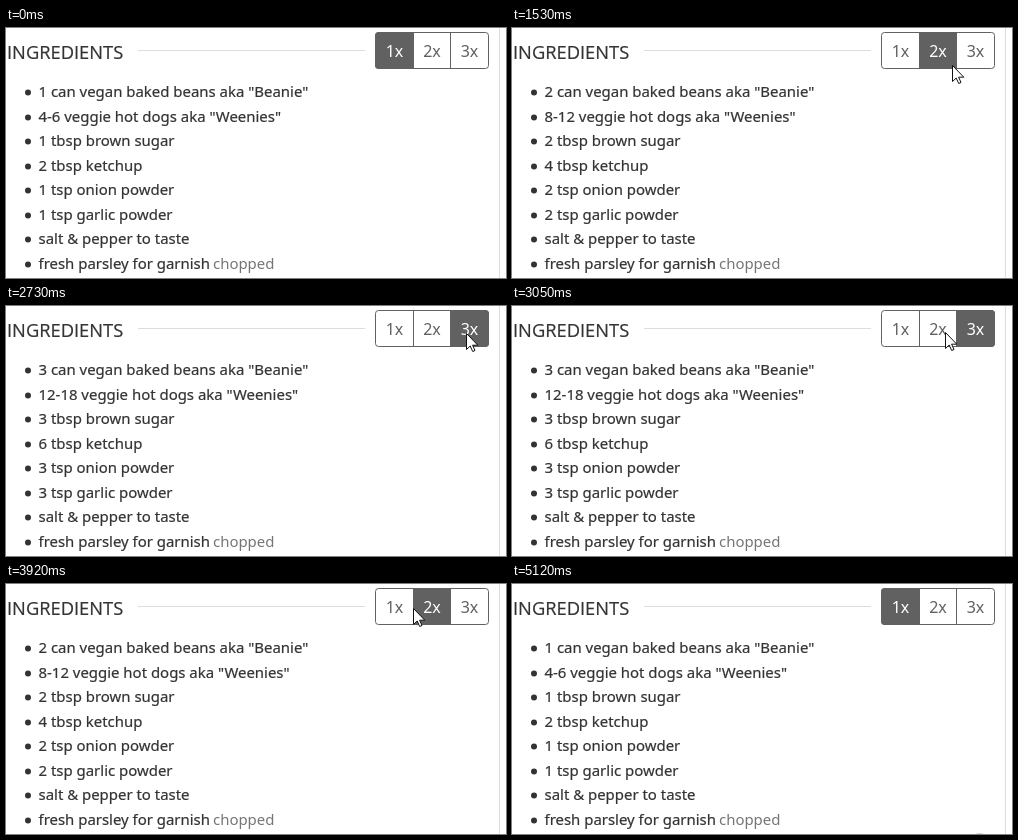
An HTML page that plays this animation: 500 px wide and 250 px high, repeating every 5200 ms.

```html
<!DOCTYPE html>
<html lang="en">
<head>
<meta charset="utf-8">
<title>Ingredient scaling</title>
<style>
  html, body { margin: 0; width: 100%; height: 100%; overflow: hidden; background: #fff; }
  svg { display: block; width: 500px; height: 250px; }
  text { font: 14.95px "Noto Sans", "Open Sans", sans-serif; fill: #333; stroke: #333; stroke-width: .2px; white-space: pre; }
  .heading { font: 18.3px "Open Sans", "Noto Sans", sans-serif; }
  .note { fill: #757575; stroke: none; }
  .rule { stroke: #ddd; }
  .scale text { font-size: 16px; text-anchor: middle; fill: #616161; stroke: none; }
  .scale path { fill: #fff; }
  .scale .on path { fill: #616161; }
  .scale .on text { fill: #fff; }
  .frame { fill: none; stroke: #616161; }
</style>
</head>
<body>
<svg viewBox="0 0 500 250">
  <text class="heading" x="1" y="31">INGREDIENTS</text>
  <path class="rule" d="M132 22.5H359M493.5 0V250"/>
  <g class="scale" id="scale"></g>
  <path class="frame" d="M407.5 4.5V40.5M444.5 4.5V40.5M372.5 4.5H479.5a3 3 0 0 1 3 3V37.5a3 3 0 0 1-3 3H372.5a3 3 0 0 1-3-3V7.5a3 3 0 0 1 3-3Z"/>
  <g id="list"></g>
  <circle id="halo" r="12" fill="#fff200"/>
  <path id="cursor" d="M.5.5V16.5L4.2 13 6.7 18.5 9 17.5 6.6 12.2H11.8Z" fill="#fff" stroke="#111"/>
  <path id="trace" d="M463 250Q467.5 248.5 472 250Z" fill="#bbb"/>
</svg>
<script>
const LOOP = 5200;
const byId = id => document.getElementById(id);
const add = (parent, tag, attrs, content = '') => {
  const el = document.createElementNS('http://www.w3.org/2000/svg', tag);
  for (const key in attrs) el.setAttribute(key, attrs[key]);
  el.textContent = content;
  return parent.appendChild(el);
};

// Each ingredient: base amounts, then the label.
const ingredients = [
  [[1], ' can vegan baked beans aka "Beanie"'],
  [[4, 6], ' veggie hot dogs aka "Weenies"'],
  [[1], ' tbsp brown sugar'],
  [[2], ' tbsp ketchup'],
  [[1], ' tsp onion powder'],
  [[1], ' tsp garlic powder'],
  [[], 'salt & pepper to taste'],
  [[], 'fresh parsley for garnish']
];
const rows = ingredients.map(([amounts, label], i) => {
  const y = Math.round(69 + i * 24.57);
  add(byId('list'), 'circle', { cx: 22, cy: y - 4.5, r: 3, fill: '#333' });
  return { amounts, label, el: add(byId('list'), 'text', { x: 32.5, y }) };
});
add(byId('list'), 'text', { x: 207, y: 241, class: 'note' }, 'chopped');

const shapes = [
  'M408 4H373a4 4 0 0 0-4 4V37a4 4 0 0 0 4 4H408Z',
  'M407 4H445V41H407Z',
  'M444 4H479a4 4 0 0 1 4 4V37a4 4 0 0 1-4 4H444Z'
];
const buttons = shapes.map((d, i) => {
  const group = add(byId('scale'), 'g', {});
  add(group, 'path', { d });
  add(group, 'text', { x: 388.5 + i * 37.5, y: 29 }, `${i + 1}x`);
  return group;
});

const smooth = k => k ** 3 * (k * (k * 6 - 15) + 10);
const easeOut = k => 1 - (1 - k) ** 2;
const linear = k => k;

// The pointer jumps through `steps` held positions between two times.
const moves = [
  { start: 140, end: 530, steps: 6, from: [464, 186], to: [424, 22], ease: easeOut, enter: true },
  { start: 1400, end: 1530, steps: 3, from: [424, 22], to: [440, 37], ease: smooth },
  { start: 1800, end: 2130, steps: 5, from: [440, 37], to: [461, 27], ease: smooth },
  { start: 2730, end: 3050, steps: 6, from: [461, 27], to: [433, 26], ease: smooth },
  { start: 3660, end: 3990, steps: 6, from: [433, 26], to: [400, 24], ease: smooth },
  { start: 4320, end: 4450, steps: 3, from: [400, 24], to: [394, 24], ease: linear },
  { start: 4520, end: 4790, steps: 5, from: [394, 24], to: [454, 243], ease: smooth },
  { start: 4850, end: 5050, steps: 3, from: [454, 243], to: [461, 248], ease: linear }
];
// Highlight: on, off, opacity.
const clicks = [[1060, 1210, 0.65], [2130, 2330, 0.55], [3250, 3460, 0.55], [4320, 4520, 0.55]];
const selections = [[0, 1], [1260, 2], [2330, 3], [3460, 2], [4520, 1]];

function pointerAt(t) {
  const move = moves.findLast(m => t >= m.start);
  if (!move) return null;
  const { start, end, steps, from, to, ease, enter } = move;
  const gap = (end - start) / (steps - 1);
  const i = Math.min(steps - 1, Math.floor((t - start) / gap + 0.01));
  const k = ease(enter ? i / (steps - 1) : (i + 1) / steps);
  return from.map((a, n) => Math.round(a + (to[n] - a) * k));
}

let shown = 0;
function select(scale) {
  if (scale === shown) return;
  shown = scale;
  for (const { amounts, label, el } of rows) {
    el.textContent = amounts.map(a => a * scale).join('-') + label;
  }
  buttons.forEach((b, i) => b.classList.toggle('on', i + 1 === scale));
}

const show = (el, visible) => el.setAttribute('visibility', visible ? 'visible' : 'hidden');

function render(t) {
  select(selections.findLast(s => t >= s[0])[1]);
  const tip = pointerAt(t);
  const leaving = t >= 5120;
  const click = clicks.find(([on, off]) => t >= on && t < off);
  show(byId('cursor'), tip && !leaving);
  show(byId('trace'), leaving);
  byId('halo').setAttribute('fill-opacity', click ? click[2] : 0);
  if (tip) {
    for (const id of ['cursor', 'halo']) byId(id).setAttribute('transform', `translate(${tip})`);
  }
}

const began = performance.now();
function tick() {
  render((performance.now() - began) % LOOP);
  requestAnimationFrame(tick);
}
tick();
</script>
</body>
</html>
```
